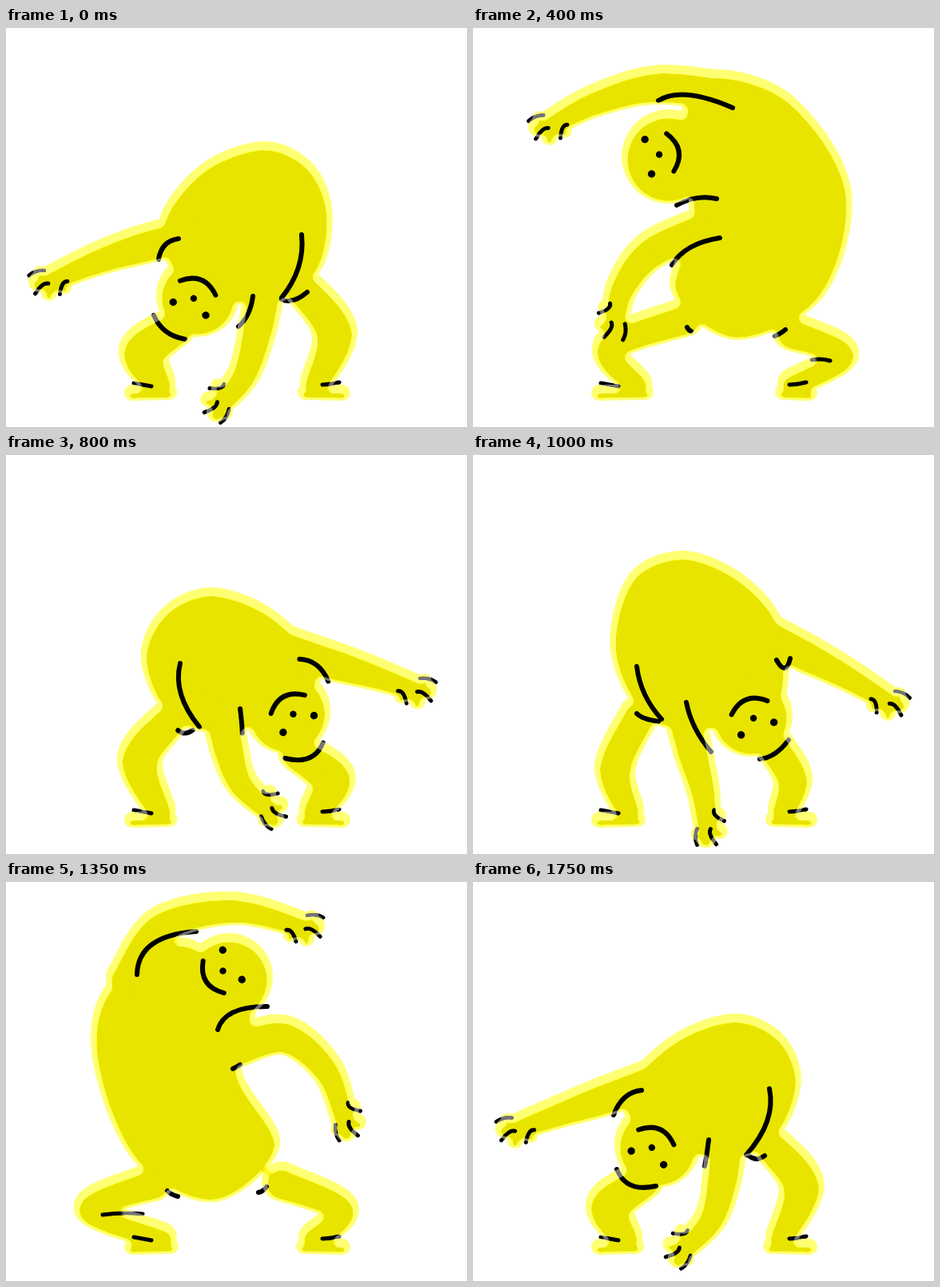
Animation, 577 px wide and 500 px high, one loop 1.8 s. Source, as an HTML page with a canvas:

```html
<!DOCTYPE html>
<html lang="en">
<head>
<meta charset="utf-8">
<title>Stretching figure</title>
<style>
html, body { margin: 0; width: 577px; height: 500px; overflow: hidden; background: #fff; }
canvas { display: block; }
</style>
</head>
<body>
<canvas id="stage" width="577" height="500"></canvas>
<script>
const W = 577, H = 500, LOOP = 1800, HALF = LOOP / 2, STEP = 50;
const AXIS = 578; // left and right mirror as x -> AXIS - x

// torso: outline clockwise from the top; head: skull and face centres;
// tilt: degrees, skull radius; a, b: arms from shoulder to hand;
// l, r: hip, knee, ankle x, knee radius; the rest are three-point creases.
const poses = [
  { t: 0,
    torso: [320,142, 380,166, 408,225, 395,302, 335,345, 230,330, 190,250, 240,174],
    head: [240,335, 236,336], tilt: [-158, 52],
    a: [235,255, 165,273, 110,291, 55,315], b: [325,310, 316,370, 299,430, 270,468],
    l: [215,372, 173,405, 193,32], r: [372,325, 411,380, 387,29],
    ca: [191,290, 199,272, 216,264], cb: [309,336, 303,358, 291,374],
    side: [370,259, 366,300, 345,338],
    hl: [185,360, 200,380, 224,390], hr: [345,340, 360,341, 377,331] },
  { t: 400,
    torso: [300,52, 400,85, 473,200, 440,335, 330,391, 248,330, 270,235, 262,95],
    head: [245,161, 236,158], tilt: [-101, 59],
    a: [340,85, 235,71, 155,90, 96,120], b: [300,245, 225,277, 188,322, 178,366],
    l: [265,362, 172,398, 205,22], r: [400,380, 463,408, 400,20],
    ca: [232,91, 270,84, 325,100], cb: [249,297, 272,275, 309,263],
    side: [255,222, 280,213, 305,214],
    hl: [268,375, 270,378, 273,380], hr: [378,386, 384,383, 391,378] },
  { t: 600,
    torso: [385,130, 458,190, 458,265, 418,325, 310,384, 225,335, 250,240, 322,160],
    head: [435,150, 440,158], tilt: [35, 54],
    a: [445,245, 520,226, 553,160, 544,97], b: [350,165, 343,85, 302,41, 250,38],
    l: [235,365, 192,400, 203,28], r: [400,365, 428,400, 395,25],
    ca: [460,226, 464,220, 468,213], cb: [387,114, 378,148, 352,170],
    side: [405,301, 412,304, 420,304],
    hl: [243,371, 254,376, 266,379], hr: [358,380, 365,378, 372,376] },
  { t: 1000,
    torso: [265,120, 345,155, 393,225, 380,330, 290,345, 215,330, 172,245, 195,150],
    head: [348,326, 350,327], tilt: [159, 52],
    a: [262,315, 275,370, 288,420, 293,465], b: [370,225, 420,250, 470,276, 520,306],
    l: [208,325, 178,390, 195,26], r: [378,365, 400,405, 388,25],
    ca: [267,310, 278,342, 298,372], cb: [380,257, 390,267, 397,255],
    side: [205,265, 215,300, 236,331],
    hl: [205,324, 215,330, 232,334], hr: [359,381, 378,374, 395,357] },
  { t: 1350,
    torso: [225,70, 310,150, 295,235, 343,330, 262,401, 160,350, 108,220, 128,125],
    head: [279,119, 269,113], tilt: [57, 55],
    a: [290,205, 350,192, 402,235, 424,298], b: [152,120, 195,54, 285,33, 372,54],
    l: [185,375, 105,408, 195,20], r: [345,375, 420,408, 385,21],
    ca: [284,234, 288,232, 293,229], cb: [164,116, 183,78, 238,62],
    side: [265,185, 285,163, 327,156],
    hl: [202,387, 207,391, 215,394], hr: [316,389, 321,387, 326,382] },
  { t: 1550,
    torso: [190,150, 285,188, 373,270, 362,348, 265,380, 172,340, 160,270, 140,190],
    head: [151,188, 149,193], tilt: [-55, 54],
    a: [205,160, 195,100, 212,60, 254,36], b: [165,275, 90,262, 47,222, 28,186],
    l: [190,360, 160,398, 185,27], r: [365,355, 400,400, 380,26],
    ca: [175,133, 190,150, 211,170], cb: [130,250, 138,253, 149,250],
    side: [167,298, 195,307, 236,312],
    hl: [212,371, 216,374, 221,376], hr: [332,369, 338,366, 343,362] },
  { t: 1750,
    torso: [325,165, 385,188, 411,245, 388,312, 335,345, 225,330, 185,265, 245,195],
    head: [231,329, 225,330], tilt: [-157, 54],
    a: [230,245, 160,270, 110,287, 55,307], b: [318,315, 312,370, 298,420, 264,458],
    l: [215,372, 172,405, 193,31], r: [375,330, 411,380, 385,29],
    ca: [176,292, 190,270, 211,261], cb: [295,323, 292,345, 290,356],
    side: [371,259, 368,300, 342,342],
    hl: [180,360, 198,380, 229,381], hr: [345,343, 355,347, 365,343] }
];
const parts = Object.keys(poses[0]).filter(k => k !== 't');

const flip = list => list.map((v, i) => i % 2 ? v : AXIS - v);
const flipLeg = g => [AXIS - g[0], g[1], AXIS - g[2], g[3], AXIS - g[4], g[5]];

function flipTorso(list) {
  const f = flip(list), out = [];
  for (let i = 0; i < 8; i++) {
    const j = (8 - i) % 8;
    out.push(f[2 * j], f[2 * j + 1]);
  }
  return out;
}

function mirror(p) {
  return {
    t: (p.t + HALF) % LOOP,
    torso: flipTorso(p.torso), head: flip(p.head), tilt: [-p.tilt[0], p.tilt[1]],
    a: flip(p.b), b: flip(p.a), l: flipLeg(p.r), r: flipLeg(p.l),
    ca: flip(p.cb), cb: flip(p.ca), side: flip(p.side), hl: flip(p.hr), hr: flip(p.hl)
  };
}

function combine(fn) {
  const out = {};
  for (const k of parts) out[k] = poses[0][k].map((_, i) => fn(k, i));
  return out;
}

// The fall is nearly over halfway through its time.
const high = poses[5], low = poses[6];
const falling = combine((k, i) => high[k][i] + (low[k][i] - high[k][i]) * 0.8);
falling.t = 1650;

const half = poses.concat(falling);
const keys = half.concat(half.map(mirror)).sort((p, q) => p.t - q.t);

function poseAt(t) {
  const n = keys.length;
  let i = n - 1;
  while (keys[i].t > t) i--;
  const at = j => keys[(j + n) % n];
  const time = j => at(j).t + LOOP * Math.floor(j / n);
  const [t0, t1, t2, t3] = [i - 1, i, i + 1, i + 2].map(time);
  const d = t2 - t1, u = (t - t1) / d, v = 1 - u;
  return combine((k, c) => {
    const [p0, p1, p2, p3] = [i - 1, i, i + 1, i + 2].map(j => at(j)[k][c]);
    const m1 = (p2 - p0) / (t2 - t0) * d, m2 = (p3 - p1) / (t3 - t1) * d;
    return p1 * (1 + 2 * u) * v * v + m1 * u * v * v
         + p2 * u * u * (3 - 2 * u) - m2 * u * u * v;
  });
}

const layer = () => Object.assign(document.createElement('canvas'), { width: W, height: H });
const shape = layer(), core = layer();
const ctx = document.getElementById('stage').getContext('2d');
const sc = shape.getContext('2d'), cc = core.getContext('2d');

const pairs = list => {
  const out = [];
  for (let i = 0; i + 1 < list.length; i += 2) out.push([list[i], list[i + 1]]);
  return out;
};

function dot(c, x, y, r) {
  c.beginPath();
  c.arc(x, y, r, 0, 7);
  c.fill();
}

function blob(pts) {
  const n = pts.length, p = i => pts[(i + n) % n];
  sc.beginPath();
  sc.moveTo(...pts[0]);
  for (let i = 0; i < n; i++) {
    const [a, b, c, d] = [p(i - 1), p(i), p(i + 1), p(i + 2)];
    sc.bezierCurveTo(b[0] + (c[0] - a[0]) / 6, b[1] + (c[1] - a[1]) / 6,
                     c[0] - (d[0] - b[0]) / 6, c[1] - (d[1] - b[1]) / 6, c[0], c[1]);
  }
  sc.fill();
}

// A soft limb: discs along a smooth curve, one radius per point.
function limb(pts, radii) {
  const last = pts.length - 1;
  const p = i => pts[Math.max(0, Math.min(last, i))];
  for (let i = 0; i < last; i++) {
    for (let s = 0; s <= 20; s++) {
      const u = s / 20;
      const [x, y] = [0, 1].map(k => {
        const a = p(i - 1)[k], b = p(i)[k], c = p(i + 1)[k], d = p(i + 2)[k];
        return b + u * ((c - a) + u * ((2 * a - 5 * b + 4 * c - d)
             + u * (3 * b - 3 * c + d - a))) / 2;
      });
      dot(sc, x, y, radii[i] + (radii[i + 1] - radii[i]) * u);
    }
  }
}

// Maps (forward, toward thumb) to the stage.
function handFrame(arm, thumb) {
  const [x0, y0, x, y] = arm.slice(4);
  const len = Math.hypot(x - x0, y - y0) || 1;
  const dx = (x - x0) / len, dy = (y - y0) / len;
  return (f, s) => [x + dx * f + dy * s * thumb, y + dy * f - dx * s * thumb];
}

const fingers = [[14, -3, 13], [8, -12, 9], [8, 15, 10], [-13, 16, 9], [-2, 2, 18]];
const knuckles = [[22, -15, 12, -16, 2, -13], [24, 9, 12, 3, 4, 4], [-4, 22, -12, 12, -19, 11]];

function stroke(x0, y0, x1, y1, x2, y2) {
  // the middle point lies on the curve
  ctx.beginPath();
  ctx.moveTo(x0, y0);
  ctx.quadraticCurveTo(2 * x1 - (x0 + x2) / 2, 2 * y1 - (y0 + y2) / 2, x2, y2);
  ctx.stroke();
}

function drawShape(p, hands) {
  sc.globalCompositeOperation = 'source-over';
  sc.clearRect(0, 0, W, H);
  sc.fillStyle = '#e8e400';
  blob(pairs(p.torso));
  dot(sc, p.head[0], p.head[1], p.tilt[1]);
  for (const arm of [p.a, p.b]) limb(pairs(arm), [27, 25, 21, 17]);
  for (const hand of hands)
    for (const [f, s, r] of fingers) dot(sc, ...hand(f, s), r);
  for (const g of [p.l, p.r])
    limb([[g[0], g[1]], [g[2], g[3]], [g[4], 445]], [25, g[5], 19]);
  limb([[158, 457], [p.l[4] + 11, 456]], [10, 10]);
  limb([[421, 457], [p.r[4] - 12, 456]], [10, 10]);
}

function drawFace(p) {
  ctx.save();
  ctx.translate(p.head[2], p.head[3]);
  ctx.rotate(p.tilt[0] * Math.PI / 180);
  dot(ctx, -22, -17, 4.7);
  dot(ctx, 22, -17, 4.7);
  dot(ctx, 0, -3, 4.2);
  stroke(-24, 11, 0, 22, 24, 11);
  ctx.restore();
}

function drawLines(p, hands) {
  ctx.fillStyle = ctx.strokeStyle = '#000';
  ctx.lineCap = 'round';
  ctx.lineWidth = 6;
  for (const k of ['ca', 'cb', 'side', 'hl', 'hr']) stroke(...p[k]);
  drawFace(p);
  ctx.lineWidth = 5;
  for (const hand of hands)
    for (const k of knuckles) stroke(...pairs(k).flatMap(q => hand(...q)));
  stroke(160, 445, 171, 447, 182, 449);
  stroke(396, 447, 407, 446, 417, 444);
  for (const g of [p.l, p.r]) {
    const gap = g[4] - g[2], way = Math.sign(gap), len = Math.abs(gap) - 40;
    if (len > 4) {
      const x = g[2] + way * 16;
      stroke(x, g[3] + 9, x + way * len / 2, g[3] + 7, x + way * len, g[3] + 8);
    }
  }
}

// Lightens the rim, thickest along the top.
function drawRim() {
  cc.globalCompositeOperation = 'copy';
  cc.drawImage(shape, 0, 0);
  cc.globalCompositeOperation = 'destination-in';
  for (let i = 0; i < 16; i++) {
    const a = i * Math.PI / 8;
    cc.drawImage(shape, 7 * Math.cos(a), 4 + 7 * Math.sin(a));
  }
  sc.globalCompositeOperation = 'destination-out';
  sc.drawImage(core, 0, 0);
  sc.globalCompositeOperation = 'source-in';
  sc.fillStyle = '#747474';
  sc.fillRect(0, 0, W, H);
  ctx.globalCompositeOperation = 'lighter';
  ctx.drawImage(shape, 0, 0);
  ctx.globalCompositeOperation = 'source-over';
}

function draw(t) {
  const p = poseAt(t);
  const hands = [handFrame(p.a, 1), handFrame(p.b, -1)];
  drawShape(p, hands);
  ctx.fillStyle = '#fff';
  ctx.fillRect(0, 0, W, H);
  ctx.drawImage(shape, 0, 0);
  drawLines(p, hands);
  drawRim();
}

const start = performance.now();
let shown = -1;
function tick() {
  const t = Math.floor((performance.now() - start) % LOOP / STEP) * STEP;
  if (t !== shown) draw(shown = t);
  requestAnimationFrame(tick);
}
tick();
</script>
</body>
</html>
```
